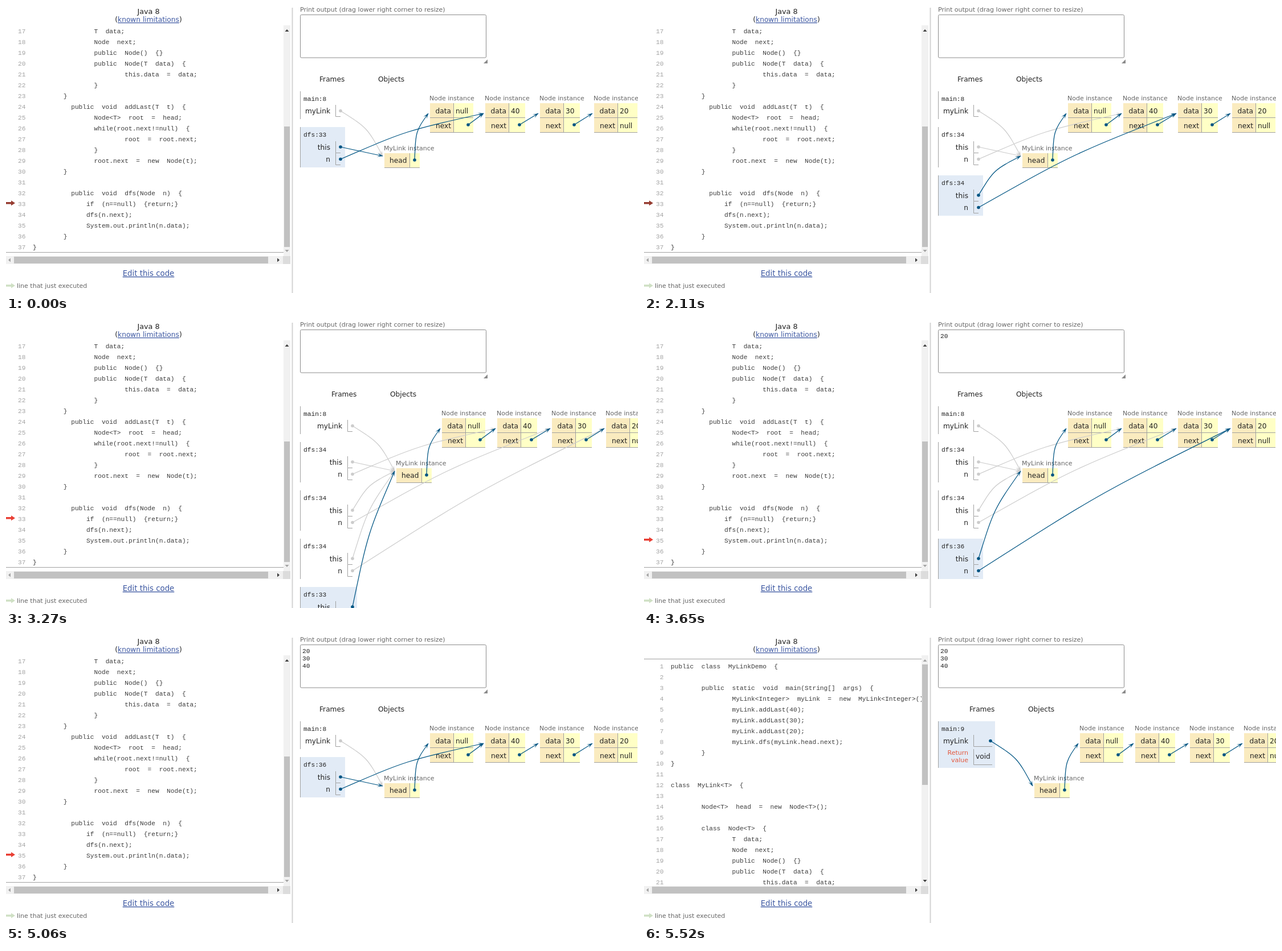
An HTML page for the animation above (5600 ms loop, 1109 by 505 pixels).

```html
<!DOCTYPE html>
<html lang="en">
<head>
<meta charset="utf-8">
<title>Recursive list walk</title>
<style>
  html, body { margin: 0; width: 100%; height: 100%; overflow: hidden; background: #fff; }
  svg { display: block; }
  text { font: 12.2px "DejaVu Sans", sans-serif; fill: #222; white-space: pre; }
  .mono { font: 11.2px "Liberation Mono", monospace; }
  .code { fill: #3c3c3c; }
  .num { fill: #a4a4a4; text-anchor: end; }
  .small { font-size: 11px; fill: #666; }
  .mid { text-anchor: middle; }
  .end { text-anchor: end; }
  .link { fill: #3d58a2; text-decoration: underline; }
  .ret { font-size: 11px; fill: #e4573d; text-anchor: end; }
  .line { fill: none; stroke: #a0a0a0; }
  .key { fill: #faebbf; }
  .val { fill: #ffffc6; }
  .track { fill: #f1f1f1; }
  .thumb { fill: #c1c1c1; }
  .ptr { fill: none; stroke-width: 1.25; }
</style>
</head>
<body>
<svg width="1109" height="505" viewBox="0 0 1109 505">
  <defs>
    <clipPath id="pane"><rect y="34" width="487" height="406"/></clipPath>
    <marker id="on" markerUnits="userSpaceOnUse" markerWidth="10" markerHeight="8" refX="9.500" refY="4" orient="auto">
      <path d="M0 0.500L10 4L0 7.500L5 4Z" fill="#005583"/>
    </marker>
    <marker id="off" markerUnits="userSpaceOnUse" markerWidth="10" markerHeight="8" refX="9.500" refY="4" orient="auto">
      <path d="M0 0.500L10 4L0 7.500L5 4Z" fill="#ccc"/>
    </marker>
    <path id="pointer" d="M0 -1.700H9V-4.500L16 0L9 4.500V1.700H0Z"/>
  </defs>

  <text class="mid" x="250" y="14" style="font-size:12.8px">Java 8</text>
  <text class="mid" x="250" y="28">(<tspan class="link">known limitations</tspan>)</text>

  <g clip-path="url(#pane)">
    <g id="code"></g>
  </g>
  <rect class="track" x="487" y="34" width="12" height="406"/>
  <rect class="thumb" id="thumb" x="488" y="212" width="10" height="212"/>
  <path id="up" d="M489.5 45L493 41L496.5 45Z"/>
  <path id="down" d="M489.5 429L493 433L496.5 429Z"/>
  <rect class="track" y="440" width="487" height="14"/>
  <rect class="thumb" x="14" y="441" width="446" height="12"/>
  <rect x="486" y="440" width="13" height="14" fill="#dcdcdc"/>
  <path d="M8 443.500L4 447L8 450.500Z" fill="#a3a3a3"/>
  <path d="M476 443.500L480 447L476 450.500Z" fill="#404040"/>
  <text class="link mid" x="250" y="475" style="font-size:13.3px">Edit this code</text>
  <use href="#pointer" y="492" fill="#cfe0c4"/>
  <text class="small" x="19" y="496">line that just executed</text>
  <text class="small" x="19" y="513">next line to execute</text>
  <path d="M502.500 3V505" stroke="#d4d4d4" stroke-width="2"/>

  <text class="small" x="516" y="10">Print output (drag lower right corner to resize)</text>
  <rect x="516.500" y="15.500" width="326" height="75.500" rx="2" fill="#fff" stroke="#8c8c8c"/>
  <path d="M838 101H845V94Z" fill="#8a8a8a"/>
  <g id="output"></g>
  <g id="stack"></g>
  <g id="heap">
    <text x="550" y="133">Frames</text>
    <text x="653" y="133">Objects</text>
    <g id="objects"></g>
    <g id="pointers"></g>
  </g>
</svg>
<script>
const LOOP = 5600, LINE = 19, CHAR = 6.72, SCROLL = 313, PITCH = 85;
const $ = id => document.getElementById(id);
const esc = s => s.replace(/&/g, '&amp;').replace(/</g, '&lt;');
const text = (x, y, s, cls = '') => `<text x="${x}" y="${y}" class="${cls}">${esc(s)}</text>`;
const rect = (x, y, w, h, cls) => `<rect x="${x}" y="${y}" width="${w}" height="${h}" class="${cls}"/>`;
const path = d => `<path class="line" d="${d}"/>`;

// Leading digits give the indent in characters; inner spaces are doubled.
const source = `0 public class MyLinkDemo {

8 public static void main(String[] args) {
16 MyLink<Integer> myLink = new MyLink<Integer>();
16 myLink.addLast(40);
16 myLink.addLast(30);
16 myLink.addLast(20);
16 myLink.dfs(myLink.head.next);
8 }
0 }

0 class MyLink<T> {

8 Node<T> head = new Node<T>();

8 class Node<T> {
16 T data;
16 Node next;
16 public Node() {}
16 public Node(T data) {
24 this.data = data;
16 }
8 }
10 public void addLast(T t) {
16 Node<T> root = head;
16 while(root.next!=null) {
24 root = root.next;
16 }
16 root.next = new Node(t);
8 }

10 public void dfs(Node n) {
14 if (n==null) {return;}
14 dfs(n.next);
14 System.out.println(n.data);
8 }
0 }`.split('\n');

$('code').innerHTML = path('M0 40.500H487M0 746.500H487') + source.map((row, i) => {
  const y = 57 + i * LINE, [, indent, body] = row.match(/^(\d+) (.*)$/) || [0, 0, ''];
  return text(34.5, y, String(i + 1), 'mono num') +
    text(47 + indent * CHAR, y, body.replace(/ /g, '  '), 'mono code');
}).join('') + '<use id="cursor" href="#pointer"/>';

function node(x, valueWidth, data, next) {
  return text(x - 1, 166, 'Node instance', 'small') +
    [['data', data, 171], ['next', next, 197]].map(([key, value, y]) =>
      rect(x, y, 41, 25, 'key') + rect(x + 41, y, valueWidth, 25, 'val') +
      path(`M${x} ${y + 25.5}H${x + 41 + valueWidth}M${x + 41.5} ${y}V${y + 25}`) +
      text(x + 37, y + 18, key, 'end') + text(x + 45, y + 18, value)).join('');
}

$('objects').innerHTML = node(744, 35, 'null', '') + node(841, 29, '40', '') +
  node(937, 29, '30', '') + node(1032, 35, '20', 'null') +
  text(663, 254, 'MyLink instance', 'small') +
  rect(664, 259, 45, 25, 'key') + rect(709, 259, 17, 25, 'val') +
  path('M664 284.500H726M708.500 259V284') + text(673, 276, 'head');

// Long links bow away from their midpoint; short ones stay straight.
const BOW = 10, STRAIGHT = 80;
function link(x, y, [tx, ty], on) {
  const color = on ? '#005583' : '#ccc';
  const bow = Math.hypot(tx - x, ty - y) > STRAIGHT ? BOW : 0;
  const mid = `${(x + tx) / 2 + (ty > y ? bow : -bow)} ${(y + ty) / 2 - bow}`;
  return `<circle cx="${x}" cy="${y}" r="2.8" fill="${color}"/>` +
    `<path class="ptr" stroke="${color}" marker-end="url(#${on ? 'on' : 'off'})" ` +
    `d="M${x} ${y}C${mid} ${mid} ${tx} ${ty}"/>`;
}

const listHead = [661, 264];
const nodeEnds = [[741, 189], [838, 189], [934, 189], [1029, 189]];
const heapLinks = [[717, 271], [811, 209], [901, 209], [997, 209]]
  .map(([x, y], i) => link(x, y, nodeEnds[i], true)).join('');

// [time, dfs depth, line, returned, printed rows]
const states = [
  [0, 1, 33, 0, 0], [1340, 1, 34, 0, 0], [1640, 2, 33, 0, 0], [1960, 2, 34, 0, 0],
  [2270, 3, 33, 0, 0], [2510, 3, 34, 0, 0], [2810, 4, 33, 0, 0], [3120, 4, 33, 1, 0],
  [3340, 3, 35, 0, 0], [3650, 3, 36, 0, 1], [3960, 3, 36, 1, 1], [4190, 2, 35, 0, 1],
  [4430, 2, 36, 0, 2], [4590, 2, 36, 1, 2], [4750, 1, 35, 0, 2], [5060, 1, 36, 0, 3],
  [5220, 1, 36, 1, 3], [5370, 0, 9, 0, 3], [5520, 0, 9, 1, 3]];

function stackFrame(depth, active, line, returned, right) {
  const top = depth ? 213 + PITCH * (depth - 1) : 150;
  const rows = depth ? ['this', 'n'] : ['myLink'];
  const base = top + (depth ? 40 : 39);
  const last = base + 21 * (rows.length - 1);
  const wide = returned || depth === 4;
  const labelX = right - (returned ? 47 : wide ? 43 : 26);
  const cellX = right - (returned ? 38 : wide ? 34 : 17) + 0.5;
  const cellEnd = right - (wide ? 5 : 8);
  const bottom = last + (returned ? 43 : 10);
  let out = active ? `<rect x="516" y="${top}" width="${right - 516}" height="${bottom - top}" fill="#e2ebf6"/>` : '';
  out += path(`M516.500 ${top}V${bottom}`) + text(522, top + 17, `${depth ? 'dfs' : 'main'}:${line}`, 'mono');
  rows.forEach((name, i) => {
    const y = base + 21 * i;
    out += text(labelX, y, name, 'end') + path(`M${cellX} ${y - 15}V${y + 5.5}H${cellEnd}`);
    if (name === 'n' && depth === 4) out += text(cellX + 3.5, y, 'null');
  });
  if (returned) {
    out += text(labelX, last + 20, 'Return', 'ret') + text(labelX, last + 33, 'value', 'ret') +
      text(cellX + 3.5, last + 27, 'void') + path(`M${cellX} ${last + 10}V${last + 37.5}H${cellEnd}`);
  }
  return out;
}

function showState([, depth, line, returned, printed]) {
  const right = returned ? 616 : 595;
  let frames = '', gray = '', blue = heapLinks;
  for (let d = 0; d <= depth; d++) {
    const on = d === depth, y = d ? 248 + PITCH * (d - 1) : 184.5;
    frames += stackFrame(d, on, on ? line : d ? 34 : 8, on && returned, right);
    let links = link(587, y, listHead, on);
    if (d > 0 && d < 4) links += link(587, y + 21.5, nodeEnds[d], on);
    if (on) blue += links; else gray += links;
  }
  $('stack').innerHTML = frames;
  $('pointers').innerHTML = gray + blue;
  $('heap').setAttribute('transform', `translate(${right - 595})`);
  $('output').innerHTML = ['20', '30', '40'].slice(0, printed)
    .map((s, i) => text(520, 29.5 + 13 * i, s, 'mono')).join('');
}

// The cursor trails each state, slides, then flashes on arrival.
const DELAY = 150, SLIDE = 150, FLASH = 165;
function showCursor(t) {
  let line = 33, bright = false;
  for (let i = 1; i < states.length; i++) {
    const from = states[i - 1][2], to = states[i][2], age = t - states[i][0] - DELAY;
    if (age < 0 || to === from || to < 10) continue;
    const p = Math.min(1, age / SLIDE);
    line = from + (to - from) * (1 - Math.cos(Math.PI * p)) / 2;
    bright = p === 1 && age < SLIDE + FLASH;
  }
  $('cursor').setAttribute('y', 51.8 + (line - 1) * LINE);
  $('cursor').setAttribute('fill', bright ? '#e93f34' : '#963c31');
}

function showScroll(atTop) {
  $('code').setAttribute('transform', `translate(0 ${atTop ? 0 : -SCROLL})`);
  $('thumb').setAttribute('y', atTop ? 50 : 212);
  $('up').setAttribute('fill', atTop ? '#a3a3a3' : '#404040');
  $('down').setAttribute('fill', atTop ? '#404040' : '#a3a3a3');
}

let shown;
function draw(now) {
  const t = now % LOOP;
  const state = states.filter(s => s[0] <= t).pop();
  if (state !== shown) {
    showState(state);
    showScroll(t >= 5520);
    shown = state;
  }
  showCursor(t);
}

const start = performance.now();
function tick() {
  draw(performance.now() - start);
  requestAnimationFrame(tick);
}
tick();
</script>
</body>
</html>
```
